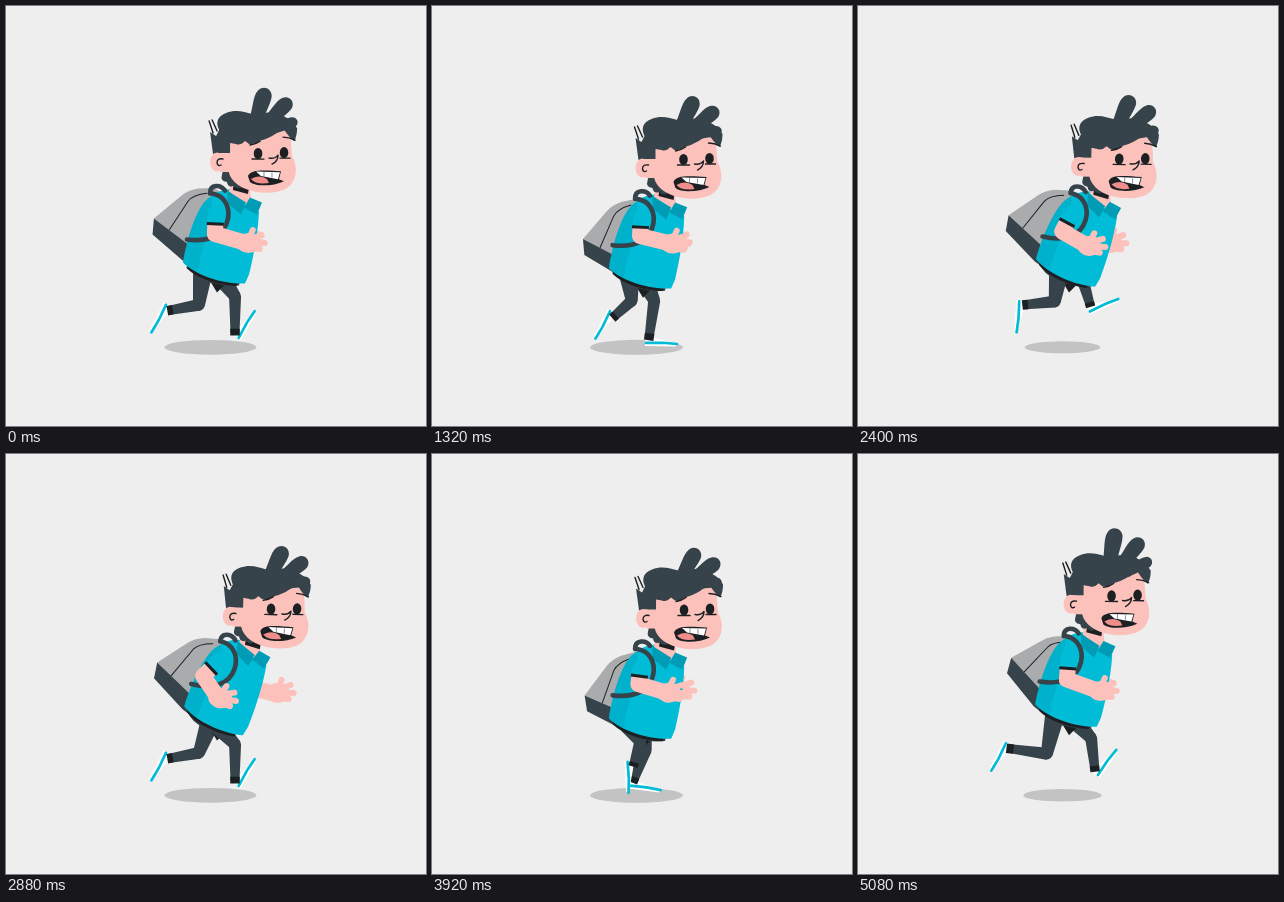
An HTML page that plays this animation: 420 px wide and 420 px high, repeating every 5.12 s.

```html
<!DOCTYPE html>
<html lang="en">
<head>
<meta charset="utf-8">
<title>Running schoolboy</title>
<style>
html, body { margin: 0; width: 100%; height: 100%; overflow: hidden; background: #eee; }
svg { display: block; width: 100vw; height: 100vh; }
.dark { fill: #36434a; }
.ink { fill: #1c2023; }
.skin { fill: #fcc1bb; }
.cyan { fill: #00bcd6; }
.teal { fill: #009bb4; }
.line { fill: none; stroke: #1c2023; stroke-width: 1.4; stroke-linecap: round; stroke-linejoin: round; }
.strap { fill: none; stroke: #36434a; stroke-width: 4.6; stroke-linecap: round; }
.limb { fill: none; stroke: #fcc1bb; stroke-width: 16; stroke-linejoin: round; }
.finger { fill: none; stroke: #fcc1bb; stroke-width: 6; stroke-linecap: round; }
.pants { fill: #36434a; stroke: #36434a; stroke-width: 2; stroke-linejoin: round; }
.cuff { fill: none; stroke: #1c2023; stroke-width: 3; }
</style>
</head>
<body>
<svg viewBox="0 0 420 420">
  <defs>
    <path id="curl" class="dark" d="M-6 5C-6 -10 -11 -23 -8 -30C-5 -38 5 -38 8 -30C10 -22 7 -10 8 6Z"/>
    <g id="hand">
      <ellipse class="skin" cx="2" rx="12" ry="10"/>
      <path class="finger" d="M6 -5L15 -8M6 0L18 0M6 5L13 6M3 -6L6 -13"/>
    </g>
    <g id="shoe">
      <path fill="#fff" d="M-4 9V2L5 1L18 4L28 6L27 9Z"/>
      <path fill="none" stroke="#00bcd6" stroke-width="2.7" stroke-linecap="round" d="M-3 6L14 5.500L28 6.500"/>
    </g>
  </defs>
  <rect width="420" height="420" fill="#eee"/>
  <ellipse id="shadow" cx="204.500" cy="341.300" fill="#c3c3c3"/>

  <g id="farHand"><path class="limb" d="M-20 -4L0 1"/><use href="#hand"/></g>

  <g id="pack">
    <path fill="#aaabad" d="M-34 -28L-5 -50Q2 -55 12 -56L28 -56L38 -48L12 4L0 0Z"/>
    <path class="line" style="stroke-width:1" d="M-19 -16L1 -44Q6 -50 20 -51"/>
    <path class="dark" d="M-34 -28L0 0L9 6L0 20L-5 17L-36 -12Z"/>
  </g>

  <g id="farLeg"></g>
  <g id="pelvis">
    <path class="dark" d="M180 255C184 272 206 284 233 281L237 266L182 248Z"/>
    <path class="ink" d="M205 278L218 281L211 288Z"/>
  </g>
  <g id="nearLeg"></g>

  <g id="torso">
    <path class="line" style="stroke-width:3" d="M182 263C192 273 212 279 230 280"/>
    <path class="cyan" d="M201 195C209 188 218 184 226 185L243 202L253 207C252 230 247 254 243 270L239 279C220 280 191 272 177 258C181 234 190 205 201 195Z"/>
    <path class="teal" opacity=".35" d="M201 195L206 192L204 222C198 240 193 255 192 267Q183 264 177 258C181 234 190 205 201 195Z"/>
    <path class="skin" d="M226 170L243 178L245 194L239 201L223 187Z"/>
    <path class="teal" d="M221 186L240 198L235 210L222 199Z"/>
    <path class="teal" d="M238 203L244 193L256 198L251 210Z"/>
    <path class="strap" d="M204 189C204 179 215 180 219 186"/>
    <path class="strap" d="M206 189C219 191 224 203 222 214C219 230 204 238 181 235"/>
  </g>

  <path id="sleeve" class="cyan"/>
  <path id="foreArm" class="limb"/>
  <path id="armBand" class="cuff"/>
  <use id="nearHand" href="#hand"/>

  <g id="head">
    <path class="ink" d="M228 177L243 182L242 188L227 184Z"/>
    <path class="dark" d="M218 160L232 166L237 180Q233 185 228 180Q222 182 221 176Q214 175 216 169Z"/>
    <path class="skin" d="M221 134C221 150 220 165 226 173C236 187 264 190 279 183C292 176 292 160 286 150L284 122L238 124Z"/>
    <use id="curl3" href="#curl"/>
    <use id="curl2" href="#curl"/>
    <use id="curl1" href="#curl"/>
    <path class="dark" d="M207 148L204 126L210 130L213 124C209 116 212 110 220 107C230 103 238 106 246 108L268 106Q286 112 291 122Q291 130 288 135Q280 128 277 121Q268 131 253 135Q248 139 243 138L239 135Q234 140 230 138L224 137V149L214 147Z"/>
    <path class="line" d="M207 127L203 115M211 125L206 114"/>
    <ellipse class="skin" cx="211" cy="156" rx="7" ry="9.500"/>
    <path class="skin" d="M212 147L226 147V166H214Z"/>
    <path class="line" d="M217 153Q211 152 211 157Q212 161 215 159"/>
    <ellipse class="ink" cx="252" cy="147.500" rx="4.300" ry="5.600"/>
    <ellipse class="ink" cx="278" cy="146.500" rx="4.300" ry="5.600"/>
    <path class="line" d="M246 153H258M274 152H284M277 131Q283 131 289 134M244 139Q250 138 254 135"/>
    <path class="line" d="M263 152Q269 153 272 149Q272 155 266 158"/>
    <path class="ink" d="M242 170C244 163 258 164 275 165L273 173L278 175C268 180 250 181 244 176Z"/>
    <path fill="#ef8d8b" d="M245 173Q254 168 261 173L263 177Q250 179 245 173Z"/>
    <path fill="#fff" d="M250 165.500L274 166L272 173L255 170Z"/>
    <path class="line" style="stroke-width:.5" d="M258 166V170M266 167V171"/>
  </g>
</svg>
<script>
const STEP = 40, CYCLE = 16;
const $ = id => document.getElementById(id);
const set = (id, name, value) => $(id).setAttribute(name, value);
const move = (id, [x, y], r = 0, s = 1) =>
  set(id, 'transform', `translate(${x} ${y}) rotate(${r}) scale(${s})`);
const mix = (a, b, t) => a.map((v, i) => v + (b[i] - v) * t);
const wave = (n, peak, period = CYCLE) => Math.cos((n - peak) / period * 2 * Math.PI);
const ramp = (n, from, to) => {
  const u = Math.min(1, Math.max(0, (n - from) / (to - from)));
  return u * u * (3 - 2 * u);
};

// Outline of a straight limb that changes width.
function taper([x1, y1], [x2, y2], w1, w2) {
  const len = Math.hypot(x2 - x1, y2 - y1) || 1;
  const nx = (y1 - y2) / len / 2, ny = (x2 - x1) / len / 2;
  return `M${x1 + nx * w1} ${y1 + ny * w1}L${x2 + nx * w2} ${y2 + ny * w2}` +
    `L${x2 - nx * w2} ${y2 - ny * w2}L${x1 - nx * w1} ${y1 - ny * w1}Z`;
}

for (const id of ['farLeg', 'nearLeg']) {
  $(id).innerHTML = `<use id="${id}Shoe" href="#shoe"/><path id="${id}Thigh" class="pants"/>` +
    `<circle id="${id}Knee" class="dark" r="5.800"/><path id="${id}Shin" class="pants"/>` +
    `<path id="${id}Cuff" class="ink"/>`;
}

// k counts steps since this foot landed.
function drawLeg(id, hip, k) {
  const knee = [
    211 - 23 * wave(k, 6.3),
    290 - 11 * wave(k, 13) + 5 * wave(k, 0.5, 8)];
  const ankle = [
    198 - 46 * wave(k, 6) + 4 * wave(k, 2.5, 8),
    307 + 11 * wave(k, 0) + 14 * wave(k, 1.2, 8)];
  const turn = -60 + 61 * ramp(k, 0, 1) + 116 * ramp(k, 1.5, 5)
    - 150 * ramp(k, 9, 12.5) - 27 * ramp(k, 12.5, 16);
  set(id + 'Thigh', 'd', taper(hip, knee, 18, 10));
  set(id + 'Shin', 'd', taper(knee, ankle, 10, 7));
  set(id + 'Cuff', 'd', taper(mix(knee, ankle, .9), mix(knee, ankle, 1.09), 9.5, 9.5));
  move(id + 'Knee', knee);
  move(id + 'Shoe', ankle, turn);
}

function drawArm(shoulder, elbow, wrist, turn) {
  const cuff = mix(shoulder, elbow, .62);
  const dx = elbow[0] - shoulder[0], dy = elbow[1] - shoulder[1], len = Math.hypot(dx, dy);
  const nx = -dy / len * 8.5, ny = dx / len * 8.5;
  set('sleeve', 'd', taper(shoulder, cuff, 14, 18));
  set('foreArm', 'd', `M${cuff}L${elbow}L${wrist}`);
  set('armBand', 'd', `M${cuff[0] + nx} ${cuff[1] + ny}L${cuff[0] - nx} ${cuff[1] - ny}`);
  move('nearHand', wrist, turn);
}

function draw(ms) {
  const n = Math.floor(ms / STEP) % CYCLE;
  const bob = wave(n, 2, 8);               // down at 1, two bounces per cycle
  const drop = Math.max(0, bob);
  const forward = (1 - wave(n, 1.5)) / 2;  // lean of the upper body
  const reach = (1 + wave(n, 15.5)) / 2;   // near arm in front at 1
  const hips = wave(n, 0);
  const by = -1.5 + 7.5 * bob;
  const lean = -0.8 + 9.2 * forward, a = lean * Math.PI / 180;

  const rx = Math.min(46.5, 42 + 9 * wave(n, 1.4, 8));
  set('shadow', 'rx', rx);
  set('shadow', 'ry', rx * .16);

  move('pack', [183 + 10 * drop, 239 + 4 * bob + 16 * drop], -3 - 13 * bob + 8 * forward);
  move('pelvis', [0, by]);
  set('torso', 'transform', `translate(0 ${by}) rotate(${lean} 210 265)`);
  drawLeg('farLeg', [208 + 3 * hips, 267 + by], n);
  drawLeg('nearLeg', [201 - 4 * hips, 266 + by], (n + 8) % CYCLE);

  const sway = 3.5 * bob;
  move('farHand', mix([270, 239], [237, 236], reach));
  drawArm([210 + 62 * Math.sin(a), 265 + by - 62 * Math.cos(a)],
    mix([197, 222 + sway], [209, 228 + sway], reach),
    mix([212, 244], [241, 237], reach), 10 * (1 - reach));

  const late = forward * forward;
  const droop = .5 + .5 * bob + .4 * late;
  set('head', 'transform',
    `translate(${6.5 - 7 * wave(n, 1)} ${8.5 * bob + 9 * late}) rotate(${2 * forward} 250 150)`);
  move('curl1', [249, 114], 8 + 23 * droop, .98 - .08 * droop);
  move('curl2', [262, 115], 36 + 20 * droop, .9 - .05 * droop);
  move('curl3', [270, 122], 60 + 22 * droop, .7 - .15 * droop);
}

const start = performance.now();
function tick() {
  draw(performance.now() - start);
  requestAnimationFrame(tick);
}
tick();
</script>
</body>
</html>
```
